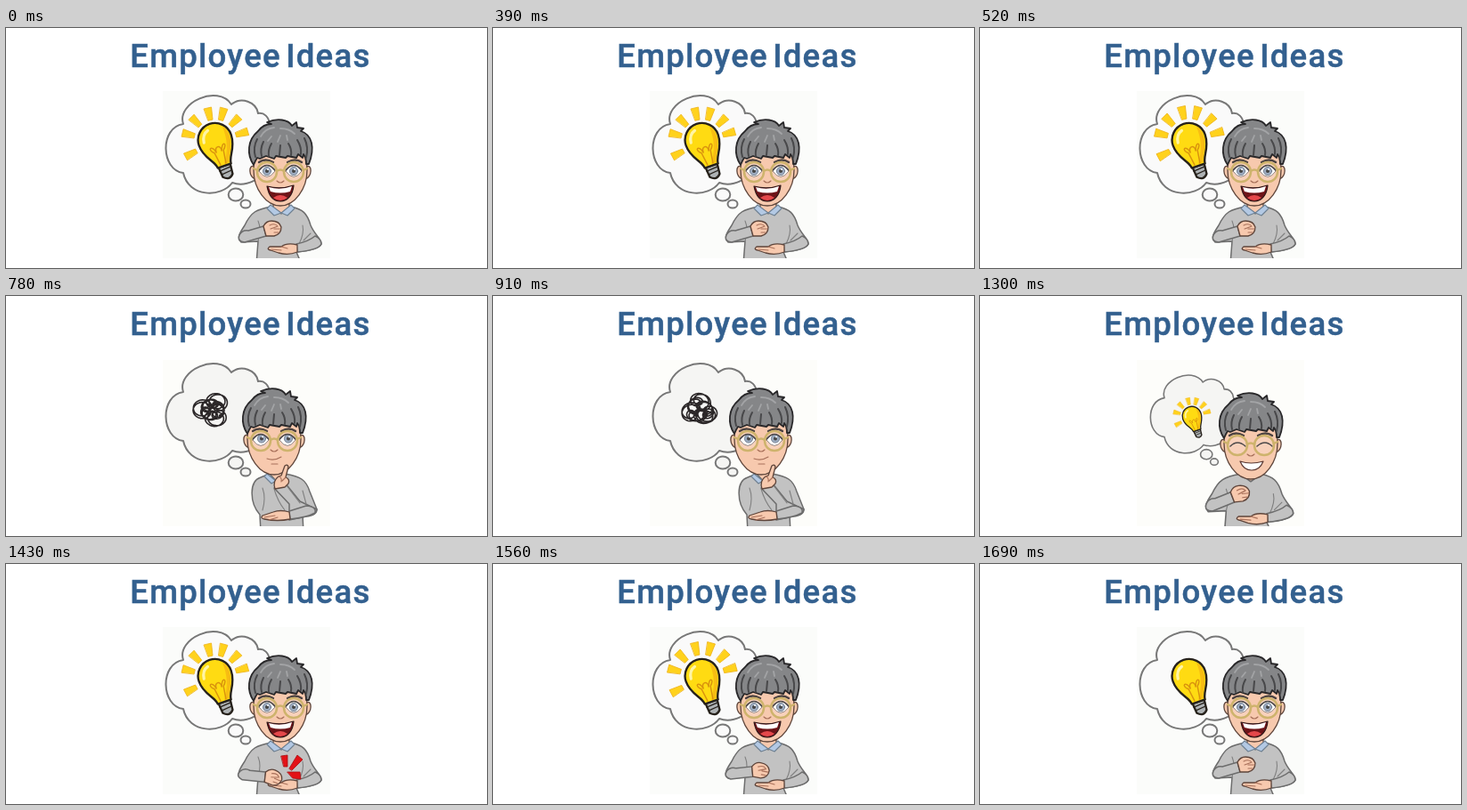
An HTML page for the animation above (1.82 s loop, 540 px wide and 270 px high).

```html
<!DOCTYPE html>
<html lang="en">
<head>
<meta charset="utf-8">
<title>Employee Ideas</title>
<style>
  html, body { margin: 0; width: 100%; height: 100%; overflow: hidden; background: #fff; }
  svg { display: block; width: 540px; height: 270px; }
  path, ellipse, circle { stroke-linecap: round; stroke-linejoin: round; }
  .title { font: 500 36.5px Roboto, sans-serif; letter-spacing: 1.25px; word-spacing: -5px; fill: #33608f; stroke: #33608f; stroke-width: .5; }
  .cloud { stroke: #777; stroke-width: 2; }
  .knit { fill: #c2c2c2; stroke: #6c6c6c; stroke-width: 1.5; }
  .fold { fill: none; stroke: #808080; stroke-width: 1.1; }
  .collar { fill: #b3c9e4; stroke: #6d7f91; stroke-width: 1.1; }
  .skin { fill: #f7c9ae; stroke: #5e453b; stroke-width: 1.3; }
  .crease { fill: none; stroke: #a8705a; stroke-width: 1.1; }
  .ink { fill: none; stroke: #2b2728; stroke-width: 1.6; }
  .rays { fill: #ffd21c; stroke: #f0b51c; stroke-width: .8; }
</style>
</head>
<body>
<svg viewBox="0 0 540 270">
  <defs><clipPath id="tile"><rect x="176" y="71" width="188" height="188"/></clipPath></defs>
  <text class="title" x="139.3" y="43.5">Employee Ideas</text>

  <g clip-path="url(#tile)">
    <rect id="paper" x="176" y="71" width="188" height="188" fill="#fbfcfa"/>

    <g id="cloud" class="cloud" fill="#fafafa">
      <path d="M199 108C191 84 238 63 253 86C264 77 281 83 283 96C290 95 295 100 296 108L304 135L284 168C277 174 265 178 254 174C242 191 205 191 199 163C174 160 172 112 199 108Z"/>
      <ellipse cx="258" cy="187.5" rx="8.3" ry="7"/>
      <ellipse cx="269" cy="198" rx="5.5" ry="4.6"/>
    </g>

    <path id="scribble" class="ink" data-in="think"/>

    <g id="bulb" data-in="idea pop">
      <g id="rays" class="rays"></g>
      <g transform="translate(235 127) rotate(-19) scale(1.06)" stroke="#26211b" stroke-width="2.2">
        <path d="M-6 28H7L6 39Q1 45-5 39Z" fill="#aeb2b4"/>
        <path d="M-6 32L7 31M-5 36L6 35" stroke-width="1.2"/>
        <path d="M-7 28C-7 20-18 14-18-1A18 18 0 0 1 18-1C18 14 8 20 8 28Z" fill="#ffdb12"/>
        <path d="M7 26C8 18 16 12 16-1Q16-8 12-12C13 3 9 15 1 26Z" fill="#f8bd13" stroke="none"/>
        <path d="M-12-2Q-11-11-4-13" fill="none" stroke="#fff5a6" stroke-width="3"/>
        <path d="M-3 26L-5 12C-12 6-5 2-3 12C-3 5 4 5 3 12C6 2 12 6 5 12L3 26" fill="none" stroke="#d9930e" stroke-width="1.4"/>
      </g>
    </g>

    <g id="body" data-in="idea pop">
      <path class="skin" d="M300 190H318V205L309 211L300 205Z"/>
      <path class="knit" d="M281 266L283 240L264 241C259 236 262 231 268 222C275 207 281 204 298 201L309 209L320 201C333 204 338 208 342 222C346 232 354 237 354 243C352 249 337 251 326 252L332 266Z"/>
      <path class="fold" d="M283 217Q287 226 283 240M333 222Q335 231 329 243M342 231L334 239"/>
      <path class="collar" data-in="idea" d="M297 199L309 208L301 211L293 203ZM320 199L309 208L316 211L324 203Z"/>
      <path class="knit" d="M326 243Q340 240 347 234Q354 237 354 243C351 249 337 251 327 252Z"/>
      <path class="skin" d="M327 244C319 242 313 243 309 246L296 246Q292 249 297 250L306 253Q317 256 327 252Z"/>
      <path class="crease" d="M309 246L316 248M298 249L309 250"/>
      <g id="arm">
        <path class="knit" d="M262 233Q265 227 272 228L289 223L292 234L268 241Q259 240 262 233Z"/>
        <path class="skin" d="M289 223Q292 217 298 217Q307 217 309 224Q309 232 301 234L292 234Z"/>
        <path class="crease" d="M296 222Q302 219 305 223Q300 225 297 226M301 226H308M301 230H306"/>
      </g>
      <g id="impact" fill="#e31217" stroke="#a80f12" stroke-width=".8">
        <path d="M309 216L316 215L316 228L312 228Z"/>
        <path d="M318 230L327 215L333 220L321 232Z"/>
        <path d="M316 234L330 234L331 242L322 241Z"/>
      </g>
    </g>

    <g data-in="think">
      <path class="skin" d="M295 190H312V210H295Z"/>
      <path class="knit" d="M286 266L285 246C273 232 273 208 286 204L296 200L304 209L313 200C331 203 337 207 341 220L349 240Q348 247 333 247L334 266Z"/>
      <path class="collar" d="M293 200L303 208L298 211L290 203Z"/>
    </g>

    <g id="head">
      <path class="skin" d="M280 156C273 152 273 168 281 170ZM338 156C345 152 345 168 337 170Z"/>
      <path class="skin" d="M280 137H338L339 160C339 181 325 200 309 200C293 200 279 181 279 160Z"/>
      <path d="M279 154C271 142 272 126 284 116C287 112 292 108 299 108L294 106C306 101 318 103 322 110L327 106L328 112L335 113L332 116C345 120 348 135 341 153L338 153Q338 146 335 142L334 146L329 142L327 146L317 144L315 146L304 144L302 147L293 144L286 147L283 146Q281 149 279 154Z" fill="#858688" stroke="#29282a" stroke-width="1.8"/>
      <path d="M283 125Q278 134 281 145M290 128Q286 136 288 144M299 130Q295 137 296 144M309 132L308 143M318 130Q322 136 321 143M328 126Q333 134 332 142M336 124Q341 134 338 146" fill="none" stroke="#48484a" stroke-width="2"/>
      <path d="M287 122Q292 113 302 112M309 113Q319 113 325 119M295 127L299 122M306 128L309 121M317 126L316 121" fill="none" stroke="#a3a4a6" stroke-width="1.8"/>
      <path d="M285 151Q292 146 301 151M317 151Q326 146 333 151" fill="none" stroke="#4c4341" stroke-width="2.4"/>

      <g data-in="idea think">
        <path d="M285 161Q294 148 303 161Q294 174 285 161ZM315 161Q324 148 333 161Q324 174 315 161Z" fill="#fff" stroke="#5e4c48" stroke-width=".8"/>
        <g id="pupils">
          <g fill="#8b9db5" stroke="#4d5b70" stroke-width=".8"><circle cx="294" cy="161" r="4.6"/><circle cx="324" cy="161" r="4.6"/></g>
          <g fill="#222"><circle cx="294" cy="161" r="2"/><circle cx="324" cy="161" r="2"/></g>
          <g fill="#fff"><circle cx="295" cy="159" r="1"/><circle cx="325" cy="159" r="1"/></g>
        </g>
        <path d="M285 160Q294 149 303 160M315 160Q324 149 333 160" class="ink"/>
      </g>
      <path data-in="pop" d="M286 163Q294 155 303 163M316 163Q325 155 333 163" class="ink"/>
      <g fill="#fff" fill-opacity=".16" stroke="#ceb36c" stroke-width="2.5">
        <circle cx="294" cy="162" r="11"/><circle cx="324" cy="162" r="11"/>
        <path d="M305 161Q309 158 313 161M283 160L279 158M335 160L339 158" fill="none"/>
      </g>
      <path class="crease" d="M305 172Q309 176 313 172"/>

      <g data-in="idea">
        <path d="M294 178Q309 182 324 177C323 188 317 195 309 195C301 195 296 189 294 178Z" fill="#6e1418" stroke="#2d1718" stroke-width="1.2"/>
        <path d="M296 179Q309 183 322 178L320 184Q309 187 298 184Z" fill="#fff"/>
        <path d="M301 191Q309 185 317 191Q309 197 301 191Z" fill="#e5484b"/>
      </g>
      <path data-in="think" class="crease" d="M301 182Q309 185 317 180M306 188H313"/>
      <path data-in="pop" d="M297 180Q309 184 323 180Q319 190 310 190Q301 190 297 180Z" fill="#fff" stroke="#5a3731" stroke-width="1.2"/>
    </g>

    <g data-in="think">
      <path class="knit" d="M318 234L301 216L313 210L330 231L349 240Q349 247 337 248L318 252Z" stroke="none"/>
      <path class="fold" d="M288 216Q292 227 288 241M333 219L337 234M301 217Q305 231 313 241M314 212L330 233"/>
      <path class="skin" d="M302 217Q299 208 306 203L309 202L313 191Q316 189 317 192L314 204Q319 206 317 211L313 215Z"/>
      <path class="crease" d="M306 203Q310 204 309 209M314 204L310 208"/>
      <path class="knit" d="M318 242L337 236Q349 237 347 244Q338 249 319 251Z"/>
      <path class="skin" d="M318 243Q308 240 300 243L288 247Q285 250 290 251Q305 254 319 251Z"/>
      <path class="crease" d="M290 249L302 247M295 252L305 249"/>
    </g>
  </g>
</svg>
<script>
const STEP = 130, STEPS = 14;
const el = id => document.getElementById(id);
const place = (id, transform) => el(id).setAttribute('transform', transform);
const parts = [...document.querySelectorAll('[data-in]')];
const scaleAbout = (s, x, y, toX = x, toY = y) =>
  `translate(${toX} ${toY}) scale(${s}) translate(${-x} ${-y})`;

const poses = {
  idea:  { paper: '#fbfcfa', cloud: '#fafafa', head: [-1, 0] },
  think: { paper: '#fdfdfa', cloud: '#f5f5f3', head: [-8, 1] },
  pop:   { paper: '#fdfdfa', cloud: '#f5f5f3', head: [-5, 6] }
};

el('rays').innerHTML = [-118, -76, -45, -13, 15, 45, 74].map(angle =>
  `<path d="M-2.5-24H2.5L4.2-38H-4.2Z" transform="translate(235 127) rotate(${angle})"/>`).join('');

// Small loops wandering around a larger orbit.
function scribble(turns, seed) {
  let d = '';
  for (let u = 0; u < turns * 2 * Math.PI; u += .04) {
    const orbit = 10 + 4 * Math.sin(3.1 * u + seed), loop = 7.3 * u + seed;
    const x = 231.5 + orbit * Math.cos(u) + 7.5 * Math.cos(loop);
    const y = 128 + orbit * Math.sin(u) * .9 + 6.5 * Math.sin(loop);
    d += `${d ? 'L' : 'M'}${x.toFixed(1)} ${y.toFixed(1)}`;
  }
  return d;
}

function draw(step) {
  const scene = step === 10 ? 'pop' : step > 5 && step < 10 ? 'think' : 'idea';
  const pose = poses[scene], pop = scene === 'pop';
  const beat = (step + 3) % STEPS;
  for (const part of parts)
    part.style.display = part.dataset.in.includes(scene) ? '' : 'none';

  el('paper').setAttribute('fill', pose.paper);
  el('paper').setAttribute('y', scene === 'idea' ? 71 : 72);
  el('cloud').setAttribute('fill', pose.cloud);
  place('cloud', pop ? 'translate(47.8 28.2) scale(.8)' : '');
  place('head', `translate(${pose.head})`);
  place('pupils', scene === 'think' ? 'translate(1 -1.5)' : '');
  place('bulb', pop ? scaleAbout(.56, 235, 127, 238, 135.5) : '');
  place('body', pop ? scaleAbout(1.06, 310, 230, 305, 231) : '');

  // Rays flash every three beats, the fist lands every four.
  const flash = pop ? 0 : beat % 3, punch = pop ? 3 : beat % 4;
  el('rays').style.display = flash === 2 ? 'none' : '';
  place('rays', flash === 1 ? scaleAbout(1.04, 235, 127) : '');
  place('arm', `rotate(${pop ? -6 : [22, 10, 0, 0][punch]} 262 235)`);
  el('impact').style.display = punch === 0 ? '' : 'none';

  if (scene === 'think')
    el('scribble').setAttribute('d', scribble(2 + (step - 6) * .25, step * 1.7));
}

let shown = -1;
function tick() {
  const step = Math.floor(performance.now() / STEP) % STEPS;
  if (step !== shown) draw(shown = step);
  requestAnimationFrame(tick);
}
tick();
</script>
</body>
</html>
```
